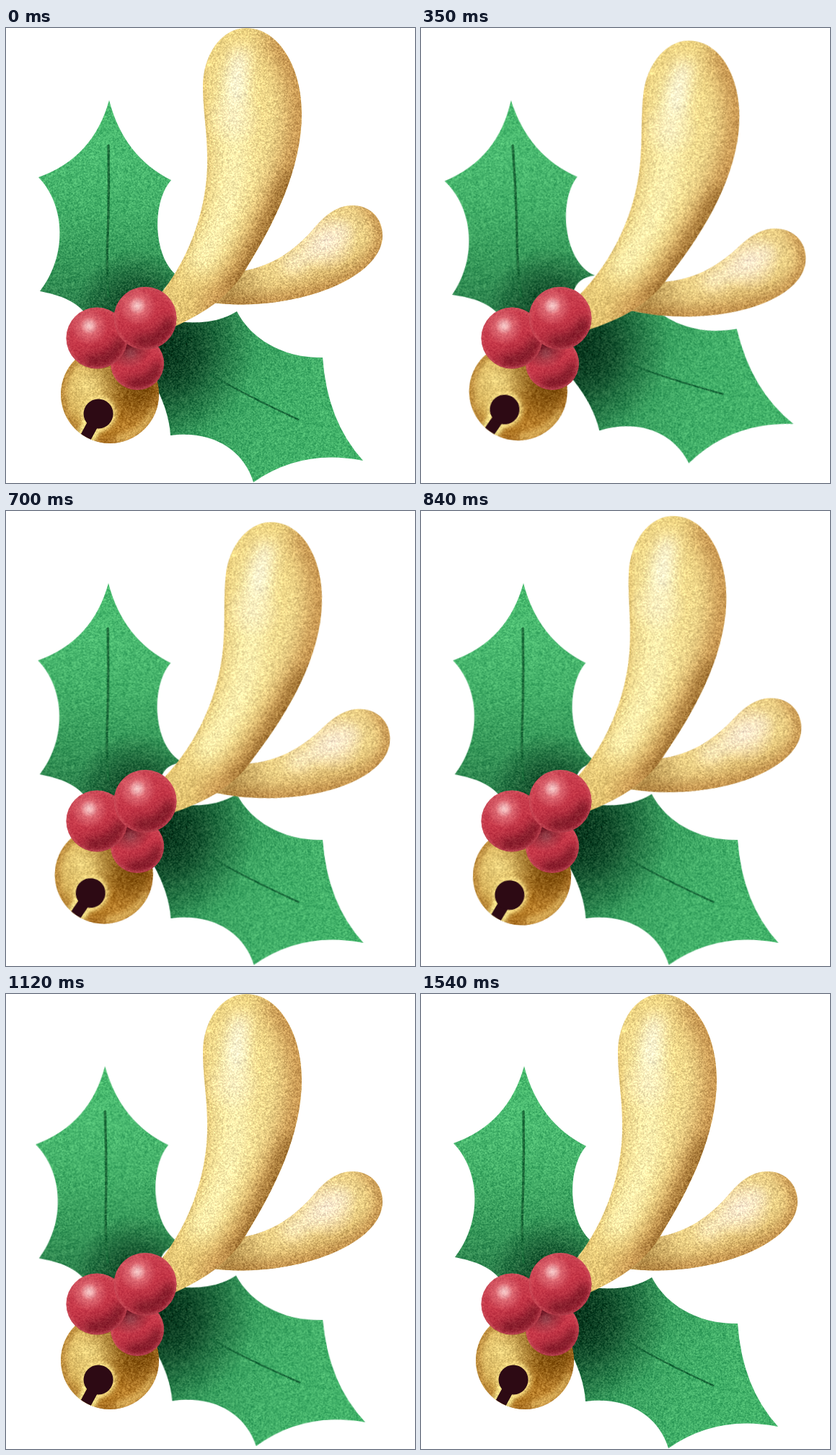
Recreate the animation shown at these times as an HTML page with a canvas. Size 567 by 631 pixels, loop 2100 ms.

```html
<!DOCTYPE html>
<html lang="en">
<head>
<meta charset="utf-8">
<title>Holly and bell</title>
<style>
html, body { margin: 0; width: 100%; height: 100%; overflow: hidden; background: #fff; }
canvas { display: block; width: 567px; height: 631px; }
</style>
</head>
<body>
<canvas id="stage" width="567" height="631"></canvas>
<script>
const W = 567, H = 631, LOOP = 2100, STEP = 70;
const ctx = document.getElementById('stage').getContext('2d');

let seed = 7;
function rand() {
  seed = (seed * 1664525 + 1013904223) >>> 0;
  return seed / 4294967296;
}

// Speckle the painted pixels with slightly clumped noise.
function grain(c, amount) {
  const img = c.getImageData(0, 0, W, H), d = img.data;
  const noise = Float32Array.from({ length: W * H }, () => rand() - 0.5);
  for (let i = W + 1; i < W * H; i++) {
    const k = i * 4;
    if (!d[k + 3]) continue;
    const n = (noise[i] + noise[i - 1] + noise[i - W] + noise[i - W - 1]) * amount;
    d[k] += n;
    d[k + 1] += n;
    d[k + 2] += n * 0.8;
  }
  c.putImageData(img, 0, 0);
}

// Paint inside an outline on its own layer.
function layer(outline, amount, paint) {
  const el = document.createElement('canvas');
  el.width = W;
  el.height = H;
  const c = el.getContext('2d', { willReadFrequently: true });
  c.save();
  c.clip(new Path2D(outline));
  paint(c);
  c.restore();
  grain(c, amount);
  return el;
}

function linear(c, x0, y0, x1, y1, ...stops) {
  const g = c.createLinearGradient(x0, y0, x1, y1);
  stops.forEach((s, i) => g.addColorStop(i / (stops.length - 1), s));
  c.fillStyle = g;
  c.fillRect(0, 0, W, H);
}

function glow(c, x, y, r, rgb, alpha) {
  const g = c.createRadialGradient(x, y, 0, x, y, r);
  g.addColorStop(0, `rgba(${rgb},${alpha})`);
  g.addColorStop(0.5, `rgba(${rgb},${alpha * 0.55})`);
  g.addColorStop(1, `rgba(${rgb},0)`);
  c.fillStyle = g;
  c.fillRect(x - r, y - r, 2 * r, 2 * r);
}

function soft(c, path, color, width, blur) {
  c.save();
  c.filter = blur ? `blur(${blur}px)` : 'none';
  c.strokeStyle = color;
  c.lineWidth = width;
  c.lineCap = 'round';
  c.stroke(new Path2D(path));
  c.restore();
}

const disc = (x, y, r) => `M${x - r},${y}a${r},${r} 0 1 1 ${2 * r},0a${r},${r} 0 1 1 ${-2 * r},0Z`;

const leftLeaf = layer(
  'M143,100 Q163,178 229,211 C199,245 205,330 246,349 Q222,350 215,370 L150,440 L112,398 ' +
  'C98,380 78,371 47,365 C86,315 82,245 45,207 Q121,180 143,100Z', 19, c => {
    linear(c, 140, 100, 140, 400, '#46b86c', '#4bbb71', '#43af68', '#37995a', '#2a7d4a');
    glow(c, 180, 392, 85, '12,62,33', 0.95);
    soft(c, 'M142,163 Q143,240 141,290 T142,372', '#1c6c3b', 3.4, 0.4);
  });

const rightLeaf = layer(
  'M320,393 C340,432 385,458 439,457 Q445,545 495,600 Q410,583 343,630 ' +
  'C330,585 285,557 228,565 Q226,530 204,490 L185,445 L225,405 Q283,416 320,393Z', 19, c => {
    linear(c, 210, 440, 460, 570, '#267a47', '#369b5c', '#41ae68', '#43b36a');
    glow(c, 215, 445, 130, '8,55,30', 1);
    glow(c, 215, 450, 75, '8,55,30', 0.6);
    soft(c, 'M284,481 Q330,508 405,543', '#17693a', 2.6, 0.5);
  });

const antler = layer(
  'M333,0 C300,0 272,35 273,85 C274,125 280,150 279,190 C278,240 262,310 212,372 L200,420 ' +
  'L234,414 C275,395 312,372 335,330 C372,270 410,195 410,118 C410,55 378,0 333,0Z', 23, c => {
    linear(c, 270, 0, 300, 410, '#efd583', '#f1da8c', '#f2dc90', '#efd787', '#e3c26e');
    soft(c, 'M380,15 C422,75 418,150 388,222 C355,300 335,345 290,388', '#c7944f', 46, 14);
    soft(c, 'M396,205 C370,275 345,325 318,362', '#8e6225', 18, 10);
    soft(c, 'M271,55 C274,125 283,170 274,235 C262,300 245,325 215,370', '#ddb964', 6, 5);
    soft(c, 'M318,70 C313,130 323,180 312,230 Q300,275 270,325', '#fff5b8', 28, 13);
    soft(c, 'M325,38 Q319,60 319,95', '#fffbe6', 20, 11);
    glow(c, 315, 125, 40, '255,245,225', 0.4);
  });

const branch = layer(
  'M300,345 L328,337 C370,330 400,308 425,280 C443,258 460,246 480,246 ' +
  'C505,246 522,264 522,288 C522,347 400,395 284,381Z', 24, c => {
    linear(c, 400, 270, 440, 380, '#ebcf85', '#edd286', '#c79a50');
    soft(c, 'M500,245 C535,275 525,320 480,350 Q400,390 300,385', '#c18d49', 20, 9);
    soft(c, 'M395,328 Q430,308 468,280', '#f9e8c0', 24, 10);
    glow(c, 445, 296, 42, '255,238,220', 0.7);
    glow(c, 312, 362, 55, '142,98,35', 0.55);
  });

const bell = layer(disc(144, 508, 68), 20, c => {
  linear(c, 80, 460, 210, 560, '#c99a45', '#d3ac54', '#b47a25', '#c38a38');
  glow(c, 112, 495, 48, '243,220,135', 0.85);
  glow(c, 185, 492, 58, '110,65,5', 0.95);
  glow(c, 140, 462, 40, '135,88,22', 0.5);
  soft(c, disc(144, 508, 67), '#a97127', 7, 5);
  soft(c, 'M205,530 Q192,560 155,571', '#edca72', 6, 4);
  soft(c, 'M128,535 L107,574', '#f8e58c', 27, 2.5);
  soft(c, 'M128,535 L128.1,535', '#f5dd84', 49, 3);
});

// The slot stays free of grain.
const slot = layer(disc(144, 508, 68), 0, c => {
  soft(c, 'M128,535 L107,574', '#2d0a14', 16, 0.6);
  soft(c, 'M128,535 L128.1,535', '#2d0a14', 41, 0.6);
});

function berry(x, y, r, light, shade) {
  return layer(disc(x, y, r), 10, c => {
    linear(c, x - r * 0.4, y - r, x + r * 0.4, y + r, '#cc4352', '#c63748', '#9a2435');
    soft(c, `M${x + r * 0.75},${y + r * 0.15} Q${x + r * 0.6},${y + r * 0.7} ${x - r * 0.2},${y + r * 0.75}`,
      '#7e1a28', r * 0.3, r * 0.14);
    soft(c, disc(x, y, r), '#cf5a64', 3, 2);
    glow(c, x - r * 0.25, y - r * 0.36, r * 0.6, '246,160,162', light);
    glow(c, x - r * 0.25, y - r * 0.4, r * 0.28, '255,235,232', light);
    glow(c, x - r * 0.35, y - r * 0.75, r * 0.95, '95,15,28', shade);
  });
}
const berries = [berry(182, 465, 37, 0.3, 0.9), berry(126, 430, 42.5, 0.7, 0), berry(193, 402.5, 43.5, 0.7, 0)];

const inOut = u => (1 - Math.cos(Math.PI * u)) / 2;
const out = u => Math.sin(Math.PI * u / 2);

// Keys: time, degrees, optional easing into the key.
const swing = [[0, 0], [560, 9.1], [1120, 0, out], [1310, 4.9], [1540, 0]];
const leftSway = [[0, 0], [350, -3.1], [700, -0.17], [840, -0.17], [1050, -1.25], [1260, -0.17], [1540, 0]];
const rightSway = [[0, 0], [400, -9.8], [700, -0.2], [840, -0.2], [1050, -1.5], [1260, -0.2], [1540, 0]];

function at(keys, t) {
  const i = keys.findIndex(k => k[0] > t);
  if (i < 0) return keys[keys.length - 1][1];
  const [t0, a] = keys[i - 1], [t1, b, ease = inOut] = keys[i];
  return a + (b - a) * ease((t - t0) / (t1 - t0));
}

function put(img, x, y, deg) {
  ctx.save();
  ctx.translate(x, y);
  ctx.rotate(deg * Math.PI / 180);
  ctx.drawImage(img, -x, -y);
  ctx.restore();
}

function draw(t) {
  const a = at(swing, t);
  ctx.fillStyle = '#fff';
  ctx.fillRect(0, 0, W, H);
  put(leftLeaf, 137, 437, at(leftSway, t));
  put(rightLeaf, 197, 445, at(rightSway, t));
  put(branch, 194, 407, a);
  put(antler, 194, 407, a);
  put(bell, 176, 422, a);
  put(slot, 176, 422, a);
  berries.forEach(b => ctx.drawImage(b, 0, 0));
}

const start = performance.now();
function tick() {
  const t = (performance.now() - start) % LOOP;
  draw(Math.floor(t / STEP) * STEP);
  requestAnimationFrame(tick);
}
tick();
</script>
</body>
</html>
```
